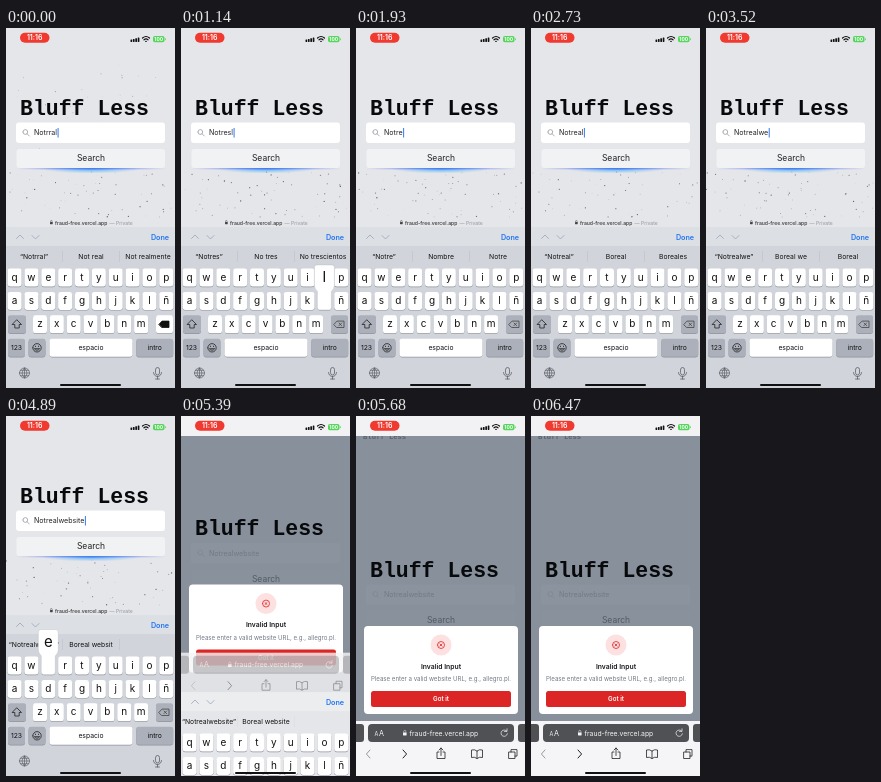
An HTML page that plays this animation: 169 by 360 pixels, repeating every 6.5 s.

```html
<!DOCTYPE html>
<html lang="es">
<head>
<meta charset="utf-8">
<style>
html, body { margin: 0; height: 100%; overflow: hidden; background: #e5e6ea; }
svg { display: block; width: 100vw; height: 100vh; font-family: Inter, "Liberation Sans", sans-serif; }
.mono { font-family: "Liberation Mono", monospace; font-weight: 700; }
.icon { fill: none; stroke-linecap: round; stroke-linejoin: round; }
</style>
</head>
<body>
<svg id="stage" viewBox="0 0 169 360" preserveAspectRatio="none">
  <defs>
    <linearGradient id="indigo">
      <stop offset="0" stop-color="#6366f1" stop-opacity="0"/>
      <stop offset=".5" stop-color="#4b7df0"/>
      <stop offset="1" stop-color="#6366f1" stop-opacity="0"/>
    </linearGradient>
    <radialGradient id="sky">
      <stop offset="0" stop-color="#38a5f8" stop-opacity=".85"/>
      <stop offset="1" stop-color="#60b5f8" stop-opacity="0"/>
    </radialGradient>
  </defs>
  <rect width="169" height="360" fill="#e5e6ea"/>
  <g id="page"></g>
  <rect id="dim" y="20" width="169" height="340" fill="rgb(100,112,126)"/>
  <g id="heading"></g>
  <g id="modal"></g>
  <g id="compact"></g>
  <g id="browser"></g>
  <g id="keyboard"></g>
  <g id="status"></g>
</svg>
<script>
const $ = id => document.getElementById(id);
const LOOP = 6500, STEP = 72, NAME = 'Bluff Less';

function add(parent, tag, attrs, content = '') {
  const el = document.createElementNS('http://www.w3.org/2000/svg', tag);
  for (const key in attrs) el.setAttribute(key, attrs[key]);
  el.textContent = content;
  return parent.appendChild(el);
}
const box = (g, x, y, width, height, fill, rx = 0) => add(g, 'rect', { x, y, width, height, fill, rx });
const icon = (g, d, width = 0.8, stroke = '#222') =>
  add(g, 'path', { d, class: 'icon', 'stroke-width': width, style: `stroke:${stroke}` });
const label = (g, text, x, y, size, fill = '#111', more = {}) =>
  add(g, 'text', { x, y, 'font-size': size, fill, 'text-anchor': 'middle', ...more }, text);
const START = { 'text-anchor': 'start' };
const ring = (x, y, r) => `M${x - r} ${y}a${r} ${r} 0 1 0 ${2 * r} 0a${r} ${r} 0 1 0 ${-2 * r} 0`;
const lock = (g, x, y, s, colour) => {
  box(g, x, y, 3 * s, 2.5 * s, colour, 0.4);
  icon(g, `M${x + 0.6 * s} ${y}v${-0.8 * s}a${0.9 * s} ${0.9 * s} 0 0 1 ${1.8 * s} 0v${0.8 * s}`, 0.5, colour);
};

// Page
const page = $('page');
let seed = 11;
const random = () => (seed = seed * 16807 % 2147483647) / 2147483647;
const dots = Array.from({ length: 130 }, (_, i) => {
  const upper = i >= 75;
  const dot = { upper, x: 4 + random() * 161, y: upper ? 30 + random() * 110 : 144 + random() * 45,
    phase: random() * 6.28, speed: 2 + random() * 4, drift: random() * 4 - 2 };
  dot.el = add(page, 'circle', { cy: dot.y, r: 0.35 + random() * 0.35, fill: '#3c4350' });
  return dot;
});
label(page, NAME, 7, -51, 7.2, '#3c434c', { ...START, class: 'mono' });
const form = add(page, 'g', {});
box(form, 10, 94.5, 149, 20.5, '#fff', 3);
icon(form, ring(19.3, 104, 2.4) + 'M21.1 105.8l2.2 2.2', 0.7, '#8a8f98');
const typed = label(form, '', 28, 107.2, 7.1, '#222', START);
const caret = box(form, 0, 100, 1, 9.5, '#3478f6');
const glow = add(page, 'g', {});
add(glow, 'ellipse', { cx: 85, cy: 141, rx: 50, ry: 4.5, fill: 'url(#sky)' });
box(glow, 10, 140, 150, 1.4, 'url(#indigo)');
const button = box(page, 10.5, 121, 148.5, 19, '#f1f2f4', 3);
label(page, 'Search', 85, 133.4, 8.5, '#222');
label($('heading'), NAME, 14, 86.5, 21.5, '#08090b', { ...START, class: 'mono' });

// Alert
const modal = $('modal');
box(modal, 8, 210, 154, 88, '#fff', 4);
add(modal, 'circle', { cx: 85, cy: 229, r: 10.5, fill: '#fde0e0' });
icon(modal, ring(85, 229, 3.5) + 'M83.9 227.9l2.2 2.2m0-2.2l-2.2 2.2', 0.8, '#dc2626');
label(modal, 'Invalid Input', 85, 252.5, 6.8, '#16181d', { 'font-weight': 600 });
label(modal, 'Please enter a valid website URL, e.g., allegro.pl.', 85, 265.2, 6.12, '#737985');
box(modal, 15, 275, 140, 16, '#dc2626', 2.5);
label(modal, 'Got it', 85, 285.2, 6.2, '#fff', { 'font-weight': 600 });

// Address bar, small and full
const ADDRESS = 'fraud-free.vercel.app';
const compact = $('compact');
lock(compact, 44, 194, 0.9, '#444');
label(compact, ADDRESS, 49, 196.9, 5.1, '#333', { ...START, 'font-weight': 500 });
label(compact, '— Private', 103.5, 196.9, 5.1, '#9095a0', START);

const browser = $('browser');
const browserBack = box(browser, 0, 305, 169, 180, '#f5f5f7');
const addressBar = add(browser, 'g', {}), tools = add(browser, 'g', {});
const DARK = '#505155', LIGHT = '#f4f4f6';
box(addressBar, -6, 308, 14, 18, DARK, 3);
box(addressBar, 162, 308, 14, 18, DARK, 3);
box(addressBar, 12, 308, 146, 18, DARK, 4);
label(addressBar, 'A', 20.5, 319.5, 5.5, LIGHT);
label(addressBar, 'A', 25.5, 319.5, 7.2, LIGHT);
lock(addressBar, 47, 316.4, 1.2, LIGHT);
label(addressBar, ADDRESS, 53.5, 319.6, 6.8, LIGHT, START);
icon(addressBar, 'M150.8 315.2a3.2 3.2 0 1 0 .6 2.6M151 312.8v2.6h-2.6', 0.7, LIGHT);
icon(tools, 'M14 334l-3.6 4 3.6 4', 1, '#999');
icon(tools, 'M47 334l3.6 4-3.6 4', 1);
icon(tools, 'M83 336h-2v6.5h8V336h-2M85 339.5V332m-2 2l2-2 2 2');
icon(tools, 'M121 335q-2.5-2-5.5-1v7.5q3-1 5.5 1q2.5-2 5.5-1V334q-3-1-5.5 1v7.5');
icon(tools, 'M153 336h6v6.5h-6zM155 336v-2.4h6v6.5h-2');

// Keyboard
const keyboard = $('keyboard');
const PITCH = 16.85, GREY = '#abb0ba', keyAt = {};
const key = (cx, cy, width, fill = '#fff') => {
  box(keyboard, cx - width / 2, cy - 8.3, width, 18, '#8f949d', 2.4);
  return box(keyboard, cx - width / 2, cy - 9, width, 18, fill, 2.4);
};
box(keyboard, 0, 199, 169, 161, '#fff');
const keyboardBack = add(keyboard, 'g', {});
box(keyboardBack, 0, 199, 169, 161, '#d1d4da');
box(keyboardBack, 0, 199, 169, 19, '#dcdfe4');
icon(keyboard, 'M10.5 210.5l3.5-3.5 3.5 3.5M26 207.5l3.5 3.5 3.5-3.5', 0.8, '#9ba5b8');
label(keyboard, 'Done', 154, 211.6, 7.2, '#2476f4', { 'font-weight': 600 });
const hints = [28, 85, 142].map(x => label(keyboard, '', x, 231.3, 6.8));
for (const x of [56.5, 113.5]) box(keyboardBack, x, 223, 0.5, 11, '#b8bcc4');

['qwertyuiop', 'asdfghjklñ', 'zxcvbnm'].forEach((letters, row) =>
  [...letters].forEach((letter, i) => {
    const x = (row === 2 ? 34 : 8.6) + i * PITCH, y = 249.5 + row * 23.4;
    keyAt[letter] = [x, y];
    key(x, y, 14);
    label(keyboard, letter, x, y + 3, 10);
  }));
key(11, 296.3, 18, GREY);
icon(keyboard, 'M11 292l4.5 4.5h-2.3v3.5h-4.4v-3.5H6.5z');
const erase = key(158.5, 296.3, 17, GREY);
const eraseIcon = icon(keyboard, 'M153 296.3l3-3.2h7v6.4h-7zM158 295l2.6 2.6m0-2.6l-2.6 2.6');
key(10.5, 319.8, 17, GREY);
label(keyboard, '123', 10.5, 322.4, 6.8);
key(31, 319.8, 17, GREY);
icon(keyboard, ring(31, 319.8, 4.2) + 'M28.6 321q2.4 2.8 4.8 0zM29.5 318.2v.4M32.5 318.2v.4');
key(85, 319.8, 83);
label(keyboard, 'espacio', 85, 322.2, 6.8);
key(148.7, 319.8, 37, GREY);
label(keyboard, 'intro', 148.7, 322.2, 6.8);
icon(keyboard, ring(18.5, 345, 5) +
  'M13.5 345h10M18.5 340v10M18.5 340q-5 5 0 10q5-5 0-10M14.5 342.3h8M14.5 347.7h8', 0.6, '#50545c');
icon(keyboard, 'M149.5 341.5a2 2 0 0 1 4 0v3.5a2 2 0 0 1-4 0zM147.5 344.5a4 4 0 0 0 8 0M151.5 348.5v2.5M149.5 351h4',
  0.7, '#50545c');
const popup = add(keyboard, 'g', {});
add(popup, 'path', { d: 'M-7.5-36h15q2.5 0 2.5 2.5v18q0 3-3 6V6.5Q7 9 4.5 9h-9Q-7 9-7 6.5V-9.5q-3-3-3-6v-18q0-2.5 2.5-2.5z',
  fill: '#fff', stroke: '#b4b8c0', 'stroke-width': 0.4 });
const popupLetter = label(popup, '', 0, -18.5, 15);

// Status bar and home indicator
const status = $('status');
const statusBack = box(status, 0, 0, 169, 20, '#f2f2f5');
box(status, 14, 4.8, 29.5, 10, '#f0392f', 5);
label(status, '11:16', 28.7, 12.3, 7, '#fff', { 'font-weight': 600 });
for (let i = 0; i < 4; i++) box(status, 124.5 + i * 2.4, 11.6 - i * 0.7, 1.7, 2.4 + i * 0.7, '#111', 0.4);
icon(status, 'M136.5 10q3.5-3 7 0M138 11.8q2-1.7 4 0M139.8 13.4h.4', 1.2, '#111');
box(status, 147, 8, 11.5, 6.3, '#55d65b', 1.8);
box(status, 159, 10, 0.8, 2.2, '#55d65b', 0.4);
label(status, '100', 152.7, 13.1, 5, '#fff', { 'font-weight': 700 });
box(status, 54, 356, 61, 2, '#111', 1);

// Time, field text, second and third suggestion
const typing = [
  [-300, 'Notrral', 'Not real', 'Not realmente'],
  [150, 'Notrra', 'Not real', 'Norte'],
  [300, 'Notrr', 'Notre', 'Norte'],
  [450, 'Notr', 'Notre', 'Notro'],
  [700, 'Notre', 'Nombre', 'Notre'],
  [900, 'Notres', 'No tres', 'No trescientos'],
  [1080, 'Notresl', 'No tres', 'No tresler'],
  [1500, 'Notres', 'No tres', 'No trescientos'],
  [1650, 'Notre', 'Nombre', 'Notre'],
  [2000, 'Notrea', 'No trea', 'Notre'],
  [2350, 'Notreal', 'Boreal', 'Boreales'],
  [3000, 'Notrealw', 'Boreal w', 'Boreal'],
  [3350, 'Notrealwe', 'Boreal we', 'Boreal'],
  [3700, 'Notrealweb', 'Boreal web', 'Boreales'],
  [4020, 'Notrealwebs', 'No tresler de', 'No tresler da'],
  [4350, 'Notrealwebsi', 'Boreal websi', ''],
  [4600, 'Notrealwebsit', 'Boreal websit', ''],
  [4850, 'Notrealwebsite', 'Boreal website', '']
];
const indexAt = t => typing.findLastIndex(entry => entry[0] <= t);
const ramp = (t, from, to) => Math.min(1, Math.max(0, (t - from) / (to - from)));
const ease = x => x * x * (3 - 2 * x);
const moveY = (el, y) => el.setAttribute('transform', `translate(0 ${y})`);
const fade = (el, value) => el.setAttribute('opacity', value);

function drawTyping(t) {
  const now = indexAt(t), [time, text] = typing[now];
  const before = now ? typing[now - 1][1] : text;
  typed.textContent = text;
  caret.setAttribute('x', 28.5 + typed.getComputedTextLength());

  const [, word, second, third] = typing[Math.max(0, indexAt(t - 110))];
  [`“${word}”`, second, third].forEach((hint, i) => hints[i].textContent = hint);

  const pressed = text.length > before.length && t - time < 130;
  fade(popup, +pressed);
  if (pressed) {
    const letter = text.at(-1);
    popupLetter.textContent = letter;
    popup.setAttribute('transform', `translate(${keyAt[letter]})`);
  }
  const erasing = t < 560 || (t >= 1480 && t < 1760);
  erase.setAttribute('fill', erasing ? '#fff' : GREY);
  eraseIcon.style.fill = erasing ? '#111' : 'none';
  eraseIcon.style.stroke = erasing ? '#111' : '#444';
}

function draw(t) {
  drawTyping(t);
  const slide = ease(ramp(t, 5250, 5550)), shade = ramp(t, 5180, 5330);
  const s = t / 1000;
  for (const dot of dots) {
    const twinkle = 0.5 + 0.5 * Math.sin(dot.phase + s * dot.speed);
    dot.el.setAttribute('cx', dot.x + dot.drift * s);
    fade(dot.el, (dot.upper ? 0.4 * (1 - ramp(t, 200, 800)) : 0.85) * twinkle * (1 - shade));
  }
  moveY(page, 74 * slide);
  moveY($('heading'), 74 * slide);
  moveY(modal, 74 * (slide - 1));
  moveY(compact, 122 * slide);
  moveY(browser, 122 * (slide - 1));
  moveY(keyboard, 175 * slide);
  fade($('dim'), 0.72 * shade);
  fade(form, 1 - 0.6 * shade);
  fade(button, 1 - 0.6 * shade);
  fade(glow, 1 - shade);
  fade(caret, 1 - shade);
  fade(modal, shade);
  fade(compact, 1 - ramp(slide, 0, 0.3));
  fade(browserBack, ramp(slide, 0, 0.55));
  fade(addressBar, slide ** 1.5);
  fade(tools, slide);
  fade(keyboardBack, 1 - slide);
  fade(statusBack, shade);
}

function tick() {
  const t = performance.now() % LOOP;
  draw(t < 60 ? 0 : 60 + Math.floor((t - 60) / STEP) * STEP);
  requestAnimationFrame(tick);
}
tick();
</script>
</body>
</html>
```
